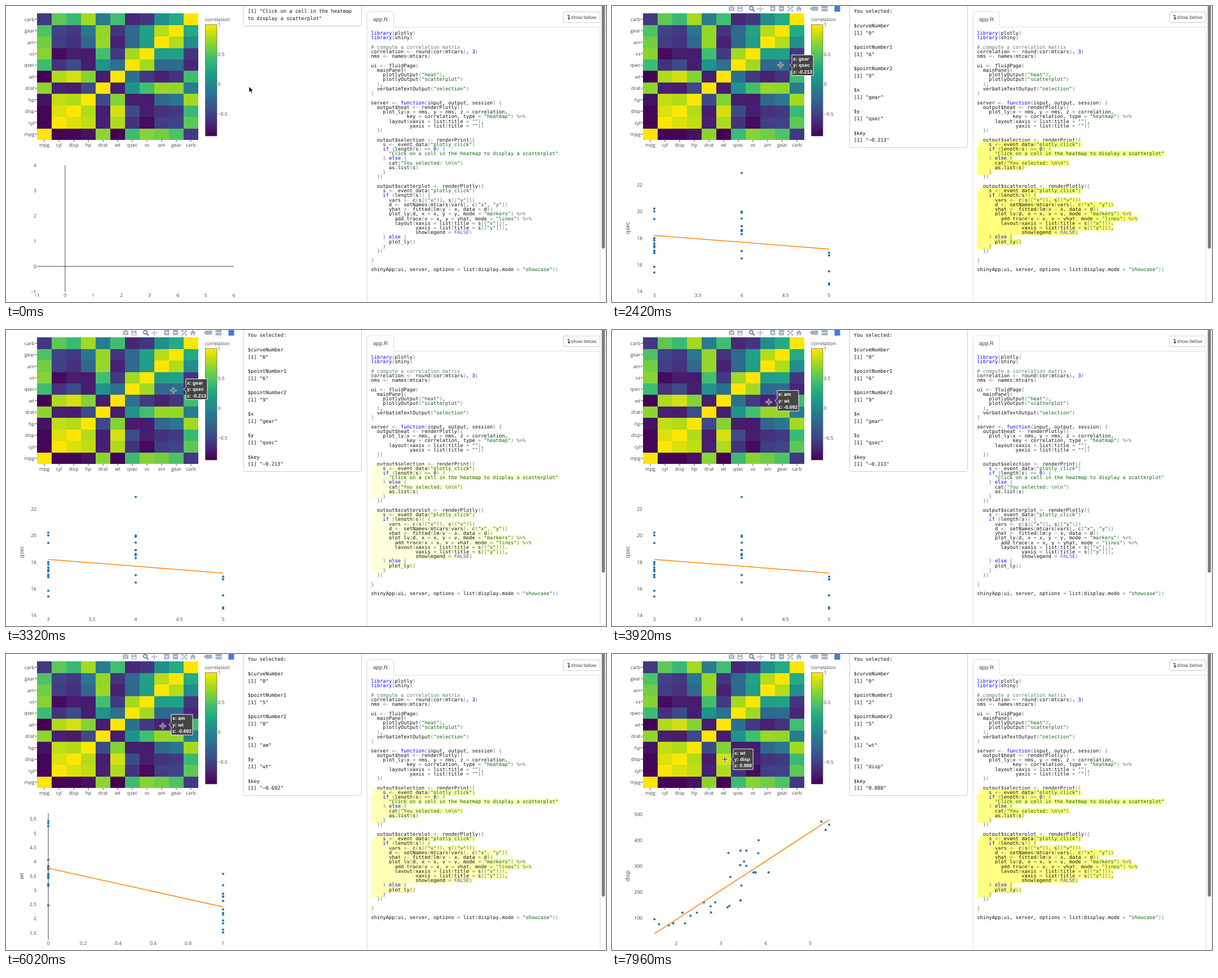
An HTML page that plays this animation: 1064x526 px, repeating every 8000 ms.

```html
<!DOCTYPE html>
<html lang="en">
<head>
<meta charset="utf-8">
<title>Heatmap and scatterplot</title>
<style>
html, body { margin: 0; width: 100%; height: 100%; overflow: hidden; background: #fff; }
svg { display: block; width: 1064px; height: 526px; }
text { white-space: pre; text-rendering: geometricPrecision; }
.plot text { font: 8.6px "Open Sans", sans-serif; fill: #444; }
.plot .title { font-size: 10px; }
.mono text { font: 8.75px "DejaVu Sans Mono", monospace; fill: #111; }
.ui text { font-family: "Liberation Sans", Arial, sans-serif; fill: #444; }
.axis { stroke: #444; stroke-width: 1; fill: none; }
.mono .com { fill: #4c886b; }
.mono .str { fill: #036a07; }
.mono .key { fill: #00f; }
.mono .lit { fill: #5848f6; }
.mono .num { fill: #0000cd; }
.mono .op { fill: #687687; }
.hl { fill: currentColor; }
#tip text { font: bold 8.65px "Liberation Sans", Arial, sans-serif; fill: #fff; }
</style>
</head>
<body>
<svg id="stage" viewBox="0 0 1064 526" xmlns="http://www.w3.org/2000/svg"></svg>
<script>
const LOOP = 8000;
const names = 'mpg cyl disp hp drat wt qsec vs am gear carb'.split(' ');
// upper triangle of the correlation matrix, in thousandths
const upper = [
  [-852, -848, -776, 681, -868, 419, 664, 600, 480, -551],
  [902, 832, -700, 782, -591, -811, -523, -493, 527],
  [791, -710, 888, -434, -710, -591, -556, 395],
  [-449, 659, -708, -723, -243, -126, 750],
  [-712, 91, 440, 713, 700, -91],
  [-175, -555, -692, -583, 428],
  [745, -230, -213, -656],
  [168, 206, -570],
  [794, 58],
  [274]
];
const cor = (i, j) => i === j ? 1 : upper[Math.min(i, j)][Math.abs(i - j) - 1] / 1000;

const cars = {
  disp: [160, 160, 108, 258, 360, 225, 360, 146.7, 140.8, 167.6, 167.6, 275.8, 275.8, 275.8, 472, 460,
    440, 78.7, 75.7, 71.1, 120.1, 318, 304, 350, 400, 79, 120.3, 95.1, 351, 145, 301, 121],
  wt: [2.62, 2.875, 2.32, 3.215, 3.44, 3.46, 3.57, 3.19, 3.15, 3.44, 3.44, 4.07, 3.73, 3.78, 5.25, 5.424,
    5.345, 2.2, 1.615, 1.835, 2.465, 3.52, 3.435, 3.84, 3.845, 1.935, 2.14, 1.513, 3.17, 2.77, 3.57, 2.78],
  qsec: [16.46, 17.02, 18.61, 19.44, 17.02, 20.22, 15.84, 20, 22.9, 18.3, 18.9, 17.4, 17.6, 18, 17.98, 17.82,
    17.42, 19.47, 18.52, 19.9, 20.01, 16.87, 17.3, 15.41, 17.05, 18.9, 16.7, 16.9, 14.5, 15.5, 14.6, 18.6],
  am: [...'11100000000000000111000001111111'].map(Number),
  gear: [...'44433334444333333444333334555554'].map(Number)
};

const esc = s => s.replace(/</g, '&lt;').replace(/>/g, '&gt;');
const text = (x, y, s, attr = '') => `<text x="${x}" y="${y}" ${attr}>${esc(String(s))}</text>`;
const rect = (x, y, w, h, attr = '') => `<rect x="${x}" y="${y}" width="${w}" height="${h}" ${attr}/>`;
const path = (d, attr = '') => `<path d="${d}" ${attr}/>`;
const END = 'text-anchor="end"', MID = 'text-anchor="middle"';
const minus = v => String(v).replace('-', '\u2212');

const stops = ['440154', '482374', '404387', '345e8d', '29788e', '20908c', '22a784', '42be70', '79d13a', 'badd16', 'fee604']
  .map(h => [0, 2, 4].map(k => parseInt(h.substr(k, 2), 16)));
function viridis(z) {
  const p = (z + 0.868) / 1.868 * 10, i = Math.min(9, Math.floor(p));
  return `rgb(${stops[i].map((c, k) => Math.round(c + (stops[i + 1][k] - c) * (p - i)))})`;
}

// heatmap geometry
const LEFT = 55, TOP = 13.2, CW = 26, CH = 20.45;
const colX = i => LEFT + i * CW;
const rowY = j => TOP + (10 - j) * CH;

function heatmap() {
  let s = '';
  names.forEach((n, i) => {
    names.forEach((m, j) => {
      const y = Math.round(rowY(j));
      s += rect(colX(i), y, CW, Math.round(rowY(j) + CH) - y, `fill="${viridis(cor(i, j))}"`);
    });
    const cx = colX(i) + CW / 2, cy = rowY(i) + CH / 2;
    s += text(cx, 250, n, MID) + text(50.5, cy + 3.2, n, END) +
      path(`M${cx} 238.2v3.4M51.4 ${cy}h3.4`, 'class="axis"');
  });
  s += text(353, 27, 'correlation');
  for (let y = 33; y < 231; y += 2) s += rect(353.5, y, 20.5, 2, `fill="${viridis(1 - (y + 1 - 33) / 198 * 1.868)}"`);
  s += rect(353.5, 33, 20.5, 198, 'fill="none" stroke="#444" stroke-width=".6"');
  for (const v of [1, 0.5, 0, -0.5]) s += text(375.6, 36.3 + (1 - v) * 106, minus(v));
  return s;
}

// x0, y0: position of zero; kx, ky: pixels per unit
function scatter({ x, y, x0, y0, kx, ky, xt, yt, xLine, yLine }) {
  const px = v => +(x0 + v * kx).toFixed(2), py = v => +(y0 - v * ky).toFixed(2);
  let s = '';
  if (yLine) s += path(`M55 ${py(0)}H404`, 'class="axis"');
  if (xLine) s += path(`M${px(0)} 283V508`, 'class="axis"');
  xt.forEach(v => s += text(px(v), 517.2, minus(v), MID));
  yt.forEach(v => s += text(54, py(v) + 3.2, minus(v), END));
  if (!x) return s;
  const X = cars[x], Y = cars[y], mean = a => a.reduce((p, c) => p + c) / a.length;
  const mx = mean(X), my = mean(Y);
  const slope = mean(X.map((v, i) => (v - mx) * (Y[i] - my))) / mean(X.map(v => (v - mx) ** 2));
  const fit = v => my + slope * (v - mx), a = Math.min(...X), b = Math.max(...X);
  X.forEach((v, i) => s += `<circle cx="${px(v)}" cy="${py(Y[i])}" r="2.05" fill="#1f77b4"/>`);
  s += path(`M${px(a)} ${py(fit(a))}L${px(b)} ${py(fit(b))}`, 'stroke="#ff8608" stroke-width="1.5" fill="none"');
  return s + text(229.5, 532, x, MID + ' class="title"') +
    text(0, 0, y, MID + ' class="title" transform="translate(30.5 394.5) rotate(-90)"');
}
const plots = [
  { x0: 104.8, y0: 462.8, kx: 49.9, ky: 45, xt: [-1, 0, 1, 2, 3, 4, 5, 6], yt: [-1, 0, 1, 2, 3, 4], xLine: 1, yLine: 1 },
  { x: 'gear', y: 'qsec', x0: -390, y0: 837.6, kx: 155, ky: 23.62, xt: [3, 3.5, 4, 4.5, 5], yt: [14, 16, 18, 20, 22] },
  { x: 'am', y: 'wt', x0: 75, y0: 571.4, kx: 310, ky: 50.6, xt: [0, 0.2, 0.4, 0.6, 0.8, 1],
    yt: [1.5, 2, 2.5, 3, 3.5, 4, 4.5, 5, 5.5], xLine: 1 },
  { x: 'wt', y: 'disp', x0: -44.6, y0: 515, kx: 79.2, ky: 0.46, xt: [2, 3, 4, 5], yt: [100, 200, 300, 400, 500] }
];

const reply = (a, b, x, y, key) => ['You selected:', ''].concat(
  Object.entries({ curveNumber: 0, pointNumber1: a, pointNumber2: b, x, y, key })
    .flatMap(([k, v]) => ['$' + k, `[1] "${minus(v)}"`, '']));
const outputs = [
  ['[1] "Click on a cell in the heatmap', 'to display a scatterplot"'],
  reply(6, 9, 'gear', 'qsec', -0.213),
  reply(5, 8, 'am', 'wt', -0.692),
  reply(2, 5, 'wt', 'disp', 0.888)
];
const panel = (lines, i) =>
  rect(421.5, -10, 209, i ? 261.5 : 45.5, 'rx="3" fill="#fff" stroke="#ccc"') +
  lines.map((l, k) => text(428.7, 12.4 + k * 12.72, l)).join('');

const code = String.raw`library(plotly)
library(shiny)

# compute a correlation matrix
correlation <- round(cor(mtcars), 3)
nms <- names(mtcars)

ui <- fluidPage(
  mainPanel(
    plotlyOutput("heat"),
    plotlyOutput("scatterplot")
  ),
  verbatimTextOutput("selection")
)

server <- function(input, output, session) {
  output$heat <- renderPlotly({
    plot_ly(x = nms, y = nms, z = correlation,
            key = correlation, type = "heatmap") %>%
      layout(xaxis = list(title = ""),
             yaxis = list(title = ""))
  })

  output$selection <- renderPrint({
    s <- event_data("plotly_click")
    if (length(s) == 0) {
      "Click on a cell in the heatmap to display a scatterplot"
    } else {
      cat("You selected: \n\n")
      as.list(s)
    }
  })

  output$scatterplot <- renderPlotly({
    s <- event_data("plotly_click")
    if (length(s)) {
      vars <- c(s[["x"]], s[["y"]])
      d <- setNames(mtcars[vars], c("x", "y"))
      yhat <- fitted(lm(y ~ x, data = d))
      plot_ly(d, x = x, y = y, mode = "markers") %>%
        add_trace(x = x, y = yhat, mode = "lines") %>%
        layout(xaxis = list(title = s[["x"]]),
               yaxis = list(title = s[["y"]]),
               showlegend = FALSE)
    } else {
      plot_ly()
    }
  })

}

shinyApp(ui, server, options = list(display.mode = "showcase"))`.split('\n');
const kinds = ['com', 'str', 'key', 'lit', 'num', 'op'];
const token = /(#.*)|("[^"]*")|\b(library|function|if|else)\b|\b(FALSE)\b|\b(\d+)\b|(<-|%>%|==|=|~|[()[\]{}]+)/g;
function paint(line) {
  let out = '', at = 0;
  for (const m of line.matchAll(token)) {
    const kind = kinds[m.slice(1).findIndex(g => g !== undefined)];
    out += esc(line.slice(at, m.index)) + `<tspan class="${kind}">${esc(m[0])}</tspan>`;
    at = m.index + m[0].length;
  }
  return out + esc(line.slice(at));
}
const CHAR = 5.268, CODE_X = 647.3;
// each line's background covers the descenders of the line above
const listing = () => code.map((line, i) => {
  const y = 51.1 + i * 8.235, trimmed = line.trimStart(), indent = line.length - trimmed.length;
  const first = i === 24 || i === 34, lit = (i >= 24 && i <= 30) || (i >= 34 && i <= 46);
  const x = CODE_X + (first ? CHAR : 0);
  return (lit ? rect(x, y - 8.1, CODE_X + line.length * CHAR - x, 10.2, 'class="hl"') : '') +
    (trimmed ? `<text x="${CODE_X + indent * CHAR}" y="${y}">${paint(trimmed)}</text>` : '');
}).join('');

const frame = () =>
  path('M640.5 526V14q0-4 4-4h39q4 0 4 4V37.5H1053.5V526', 'fill="none" stroke="#ddd"') +
  text(651, 27.2, 'app.R', 'font-size="9.8"') +
  rect(988.5, 10.5, 65, 19, 'rx="2.5" fill="#fff" stroke="#ccc"') +
  path('M995.5 16.8h2.8v6', 'fill="none" stroke="#333" stroke-width="1.2"') +
  path('M996 21.2h4.6l-2.3 3.2z', 'fill="#333"') +
  text(1002, 23.2, 'show below', 'font-size="8.55"') +
  path('M1063.5 0V526', 'stroke="#e6e6e6"') +
  rect(1056.5, -6, 5.6, 437, 'rx="2.8" fill="#7d7d7d"');

const modebar = () => {
  const c = '#a3b0cb', fill = `fill="${c}"`, line = `fill="none" stroke="${c}" stroke-width="1.3"`;
  const white = 'fill="none" stroke="#fff" stroke-width="1.3"';
  return rect(207, 1.5, 10, 7.5, `rx="1" ${fill}`) + rect(210, 0, 4, 3, fill) +
    '<circle cx="212" cy="5.2" r="2" fill="none" stroke="#fff"/>' +
    path('M222.5 0h7l2 2v7.5h-9z', fill) + rect(224.5, 5, 5, 3.5, 'fill="#fff"') + rect(224.5, 0, 4, 2.4, 'fill="#fff"') +
    '<circle cx="247" cy="4" r="3.1" fill="none" stroke="#6c7fa8" stroke-width="1.8"/>' +
    path('M249.5 6.5l3.3 3.3', 'stroke="#6c7fa8" stroke-width="2"') +
    path('M258 4.8h10M263 0v9.8', line) + path('M259.8 3l-2 1.8 2 1.8zM266.2 3l2 1.8-2 1.8zM261.2 8l1.8 2 1.8-2z', fill) +
    rect(280.5, 0, 9, 9.3, fill) + path('M282.3 4.7h5.4M285 2v5.4', white) +
    rect(296, 0, 9, 9.3, fill) + path('M297.8 4.7h5.4', white) +
    path('M312 3V.6h2.5M318 .6h2.5V3M312 6.8v2.4h2.5M318 9.2h2.5V6.8M312.5 1l7.6 7.8M320 1l-7.6 7.8', line) +
    path('M326.3 5L331.5 0l5.2 5h-1.4v4.5h-2.7V6.3h-2.2v3.2h-2.7V5z', fill) +
    path('M350.5 4.8l4-3.8h11v7.6h-11z', fill) +
    path('M370.5 2.3l2-2.2h10v4.2h-10zM370.5 7.5l2-2.2h10v4.2h-10z', fill) +
    rect(394.5, 0, 10, 10, 'fill="#447adb"');
};

const group = (id, cls, body) => `<g id="${id}" class="${cls}">${body}</g>`;
const stage = document.getElementById('stage');
stage.innerHTML =
  rect(0, 0, 1064, 526, 'fill="#fff"') +
  group('heat', 'plot', heatmap()) +
  plots.map((p, i) => group('plot' + i, 'plot', scatter(p))).join('') +
  outputs.map((o, i) => group('out' + i, 'mono', panel(o, i))).join('') +
  group('frame', 'ui', frame()) +
  group('code', 'mono', listing()) +
  group('bar', '', modebar()) +
  group('tip', '', '') +
  group('cross', '', path('M-5.5 0h11M0-5.5v11', 'stroke="#fff" stroke-width="2.8"') +
    path('M-5 0h10M0-5v10', 'stroke="#111" stroke-width="1"')) +
  group('arrow', '', path('M0 0V10.6L2.5 8.3 4.2 12.2 6 11.4 4.3 7.6H7.6Z', 'stroke="#fff" stroke-width=".8"'));

const el = id => document.getElementById(id);
const show = (id, on) => el(id).style.display = on ? '' : 'none';

// time, x, y of the pointer
const route = [
  [0, 431, 143], [920, 299, 102], [1070, 299, 102], [1520, 299, 105], [3170, 299, 105],
  [3920, 278, 128], [6020, 278, 128], [7060, 200, 185], [7210, 200, 187]
];
function pointer(t) {
  const k = route.findIndex(r => r[0] > t);
  if (k < 0) return route[route.length - 1].slice(1);
  if (!k) return route[0].slice(1);
  const a = route[k - 1], b = route[k], u = (t - a[0]) / (b[0] - a[0]), e = u * u * (3 - 2 * u);
  return [a[1] + (b[1] - a[1]) * e, a[2] + (b[2] - a[2]) * e];
}
const cellAt = ([x, y]) => {
  const i = Math.floor((x - LEFT) / CW), j = 10 - Math.floor((y - TOP) / CH);
  return i >= 0 && i < 11 && j >= 0 && j < 11 ? [i, j] : null;
};

function tick(t) {
  if (t < 770) return Math.min(600, Math.floor(t / 150) * 150);
  const base = t < 7060 ? 770 : 7060;
  return base + Math.floor((t - base) / 150) * 150;
}

function drawTip(cell) {
  show('tip', cell);
  if (!cell) return;
  const [i, j] = cell, z = cor(i, j), x = colX(i) + CW, y = rowY(j) + CH / 2;
  const w = z < 0 ? 38 : 35.2, h = 18.3;
  el('tip').innerHTML =
    path(`M${x} ${y}l4-4V${y - h}h${w}v${2 * h}h${-w}V${y + 4}z`, 'fill="#444" stroke="#fff" stroke-width=".9"') +
    ['x: ' + names[i], 'y: ' + names[j], 'z: ' + z].map((s, k) => text(x + 6, y + 3 + (k - 1) * 11.4, s)).join('');
}

const clicks = [2270, 5270, 7660];
function draw(time) {
  const t = tick(time), at = pointer(t), cell = cellAt(at);
  const state = clicks.filter(c => t >= c).length;
  for (let i = 0; i < 4; i++) {
    show('plot' + i, i === state);
    show('out' + i, i === state);
  }
  const age = state ? (t - clicks[state - 1]) / 1600 : 1;
  const blue = Math.round(120 + 135 * (0.5 - Math.cos(Math.PI * Math.min(1, age)) / 2));
  el('code').style.color = age < 1 ? `rgb(255,255,${blue})` : 'transparent';
  show('bar', at[0] < 410);
  drawTip(cell && cellAt(pointer(Math.max(0, t - 150))));
  show('cross', cell);
  show('arrow', !cell);
  el(cell ? 'cross' : 'arrow').setAttribute('transform', `translate(${at[0].toFixed(1)} ${at[1].toFixed(1)})`);
}

let start = null;
function loop() {
  const now = performance.now();
  if (start === null) start = now;
  draw((now - start) % LOOP);
  requestAnimationFrame(loop);
}
loop();
</script>
</body>
</html>
```
